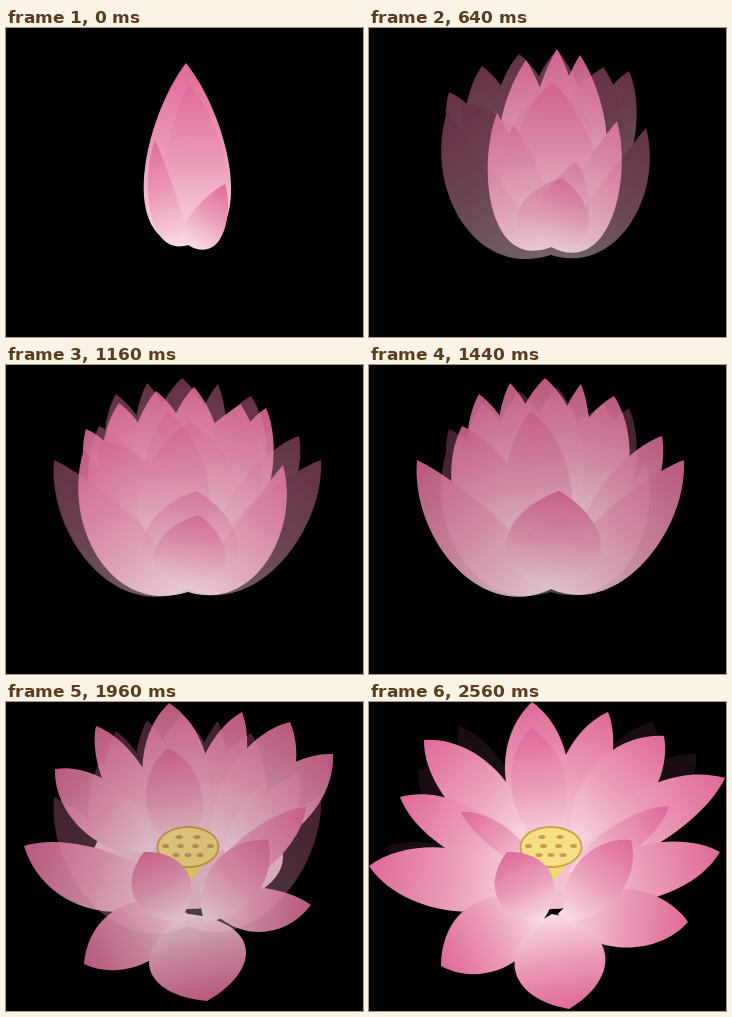
Write an HTML page that moves like this. It is 357 px wide and 309 px high and loops after 2.6 s.

```html
<!DOCTYPE html>
<html lang="en">
<head>
<meta charset="utf-8">
<title>Lotus</title>
<style>
html, body { margin: 0; width: 100%; height: 100%; overflow: hidden; background: #000; }
svg { display: block; width: 357px; height: 309px; }
</style>
</head>
<body>
<svg id="stage" viewBox="0 0 357 309"></svg>
<script>
const LOOP = 2600, STEP = 40, CENTER = 182;
const svg = document.getElementById('stage');

function add(parent, tag, attrs) {
  const el = document.createElementNS('http://www.w3.org/2000/svg', tag);
  for (const key in attrs) el.setAttribute(key, attrs[key]);
  return parent.appendChild(el);
}

let gradients = 0;

// A leaf from tip to base. left and right are its half widths, seen upright;
// belly tells how near to the base it is widest.
function petal(g, belly, [x1, y1, left, right], x2, y2) {
  const dx = x2 - x1, dy = y2 - y1, len = Math.hypot(dx, dy);
  const at = (along, side) =>
    `${x1 + dx * along - dy / len * side} ${y1 + dy * along + dx / len * side}`;
  const near = 2.2 - 1.25 * belly, far = .6 + belly;
  const d = `M${at(0, 0)}C${at(.3 * belly, near * left)} ${at(belly, far * left)} ${at(1, 0)}` +
    `C${at(belly, -far * right)} ${at(.3 * belly, -near * right)} ${at(0, 0)}Z`;

  const id = 'tint' + gradients++;
  const grad = add(g, 'linearGradient', { id, gradientUnits: 'userSpaceOnUse', x1, y1, x2, y2 });
  ['#e06a9a', '#ec9dba', '#f9dde5'].forEach((color, i) =>
    add(grad, 'stop', { offset: i / 2, 'stop-color': color }));
  add(g, 'path', { d, fill: `url(#${id})` });
}

// Petals whose bases share one height and are drawn in towards the center.
const row = (y, spread, ...petals) => (g, belly) =>
  petals.forEach(p => petal(g, belly, p, CENTER + (p[0] - CENTER) * spread, y));

function pod(g) {
  add(g, 'path', { d: 'M166 160L186 178L199 160Z', fill: '#f3da70' });
  add(g, 'ellipse', { cx: CENTER, cy: 145, rx: 30.5, ry: 20, fill: '#f6e184', stroke: '#cfa04e', 'stroke-width': 1.8 });
  [2, 4, 3].forEach((n, r) => {
    const gap = 18 - 3 * r;
    for (let i = 0; i < n; i++)
      add(g, 'ellipse', { cx: CENTER + (i - (n - 1) / 2) * gap, cy: 135 + 9 * r, rx: 3.5, ry: 2, fill: '#cb9d58' });
  });
}

const cup = row(219, .2, [138, 150, 30, 30], [262, 138, 28, 25]);

function bloom(belly, core, ...parts) {
  const g = add(svg, 'g', { opacity: 0 });
  add(g, 'ellipse', { cx: CENTER, cy: 155, rx: core, ry: 52, fill: '#f3c3d2' });
  parts.forEach(part => part(g, belly));
  return g;
}

const blooms = [
  bloom(1, 30,
    row(217, 0, [180, 35, 45, 45], [183, 56, 28, 43], [149, 112, 27, 4], [219, 156, 14, 25])),

  bloom(1, 48,
    row(170, .6, [157, 32, 36, 24], [211, 27, 24, 36], [188, 21, 28, 28]),
    row(219, 0, [183, 52, 50, 52], [128, 85, 42, 8], [144, 97, 38, 14], [248, 93, 10, 42], [208, 134, 26, 30])),

  bloom(.85, 80,
    row(175, .5, [80, 64, 24, 24], [113, 38, 36, 26], [260, 43, 26, 26], [150, 26, 36, 34], [235, 39, 36, 20], [188, 22, 32, 32]),
    row(205, .1, [94, 75, 30, 40], [235, 40, 42, 46], [183, 57, 52, 54]),
    row(227, 0, [78, 84, 54, 2], [277, 100, 2, 46], [193, 150, 40, 34])),

  bloom(.85, 95,
    row(165, .45, [110, 29, 32, 24], [141, 18, 25, 24], [212, 19, 22, 18], [245, 31, 32, 34], [176, 13, 38, 38]),
    row(190, .3, [293, 71, 24, 30], [93, 61, 42, 28], [162, 46, 34, 34]),
    row(224, 0, [48, 95, 52, 14], [315, 95, 18, 47], [190, 126, 50, 48])),

  bloom(.75, 95,
    row(150, .25, [90, 24, 22, 22], [236, 10, 26, 20], [284, 20, 28, 36], [163, 1, 34, 34], [49, 67, 30, 26], [327, 52, 26, 32], [162, 46, 30, 28]),
    row(190, .1, [300, 105, 16, 24], [305, 203, 12, 34], [18, 144, 41, 20]),
    row(212, 0, [78, 262, 26, 36], [201, 299, 50, 50]),
    pod, cup),

  bloom(.75, 88,
    row(145, .2, [163, 0, 35, 30], [239, 10, 28, 22], [55, 38, 26, 32], [295, 34, 36, 30], [162, 26, 28, 28]),
    row(170, .15, [356, 76, 36, 20], [31, 95, 22, 28], [92, 110, 9, 16], [300, 104, 14, 18]),
    row(190, .1, [351, 150, 27, 28], [0, 164, 32, 31]),
    row(212, .05, [319, 220, 30, 30], [72, 264, 30, 42], [200, 307, 46, 47]),
    pod, cup)
];

// The next bloom comes in fast, lingers halfway, and is full just before the old one is gone.
function rise(p) {
  const q = Math.min(1, 1.08 * p);
  return q + .2 * Math.max(0, Math.sin(2 * Math.PI * q));
}
const fall = p => 1 - p ** 1.4;

function draw(t) {
  const pos = Math.floor(t % LOOP / STEP) * STEP / LOOP * (blooms.length - 1);
  const k = Math.floor(pos), p = pos - k;
  blooms.forEach((g, i) =>
    g.setAttribute('opacity', i === k ? fall(p) : i === k + 1 ? rise(p) : 0));
}

const start = performance.now();
function tick() {
  draw(performance.now() - start);
  requestAnimationFrame(tick);
}
tick();
</script>
</body>
</html>
```
